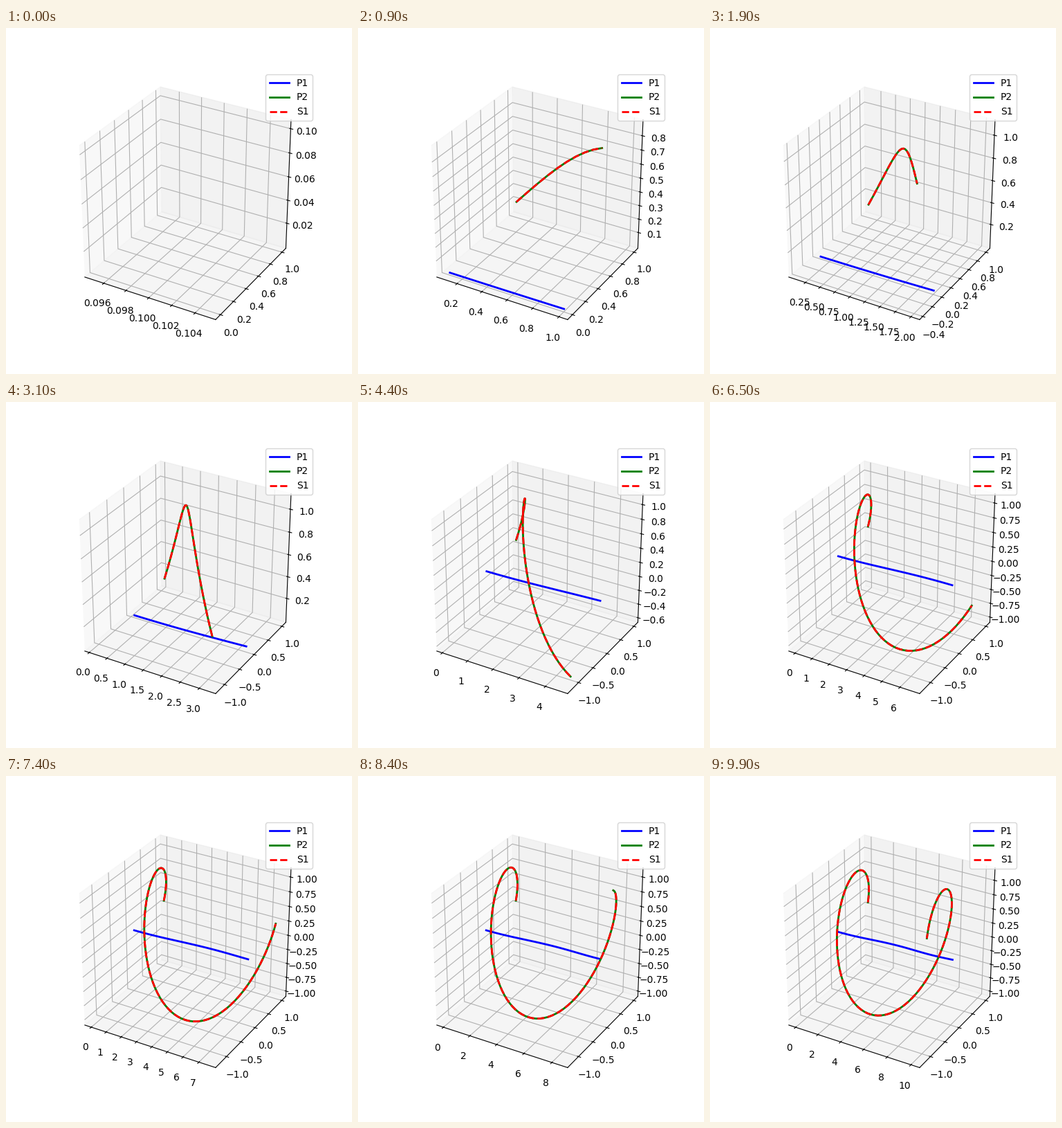
Recreate the animation shown at these times as a matplotlib script. Size 500x500 px, loop 10000 ms.

```python
import numpy as np
import matplotlib.pyplot as plt
from matplotlib.animation import FuncAnimation
from matplotlib.ticker import MaxNLocator

FRAMES, INTERVAL = 100, 100
MASS_1, MASS_2 = 1.0, 0.008
SPEED = 1.053        # sideways launch speed of the light body, one unit away
EDGE = 1 / 48        # gap between the axis limits and the panes


def orbit(t):
    """Exact two-body motion in the (y, z) plane, starting at periapsis."""
    mu = MASS_1 + MASS_2
    a = 1 / (2 - SPEED**2 / mu)
    e = 1 - 1 / a
    mean = np.sqrt(mu / a**3) * t
    ecc = mean.copy()
    for _ in range(20):
        ecc = mean + e * np.sin(ecc)
    rel = np.array([a * (np.cos(ecc) - e),
                    a * np.sqrt(1 - e**2) * np.sin(ecc)])
    share = MASS_2 / mu
    centre = np.array([np.full_like(t, share), share * SPEED * t])
    return centre - share * rel, centre + (1 - share) * rel


time = 0.1 * np.arange(1, FRAMES + 1)
heavy, light = orbit(time)

fig = plt.figure(figsize=(5, 5), dpi=100)
ax = fig.add_subplot(projection="3d")
ax.set_box_aspect((1, 1, 1), zoom=np.sqrt(3) / 1.8294640721620434)
ax.apply_aspect = lambda position=None: None   # keep the full subplot box

styles = (("b-", "P1", heavy), ("g-", "P2", light), ("r--", "S1", light))
lines = [(ax.plot([], [], [], fmt, lw=2, label=name)[0], path)
         for fmt, name, path in styles]
ax.legend(loc="upper right")

locator = MaxNLocator(9, steps=[1, 2, 2.5, 5, 10])


def fit(axis, set_lim, values, margin):
    """Fit one axis to its values and place the ticks."""
    lo, hi = np.min(values), np.max(values)
    if hi - lo < 1e-9:
        lo, hi = 0.95 * lo, 1.05 * hi
    pad = margin * (hi - lo)
    lo, hi = lo - pad, hi + pad
    ticks = locator.tick_values(lo, hi)
    gap = EDGE * (hi - lo)
    axis.set_ticks(ticks[(ticks >= lo) & (ticks <= hi)])
    set_lim(lo - gap, hi + gap)


def update(i):
    n = i + 1
    for line, (y, z) in lines:
        line.set_data_3d(time[:n], y[:n], z[:n])
    both = np.stack([heavy, light])[:, :, :n]
    fit(ax.xaxis, ax.set_xlim, time[:n], 0.05)
    fit(ax.yaxis, ax.set_ylim, both[:, 0], 0.05)
    fit(ax.zaxis, ax.set_zlim, both[:, 1], 0)
    return [line for line, _ in lines]


anim = FuncAnimation(fig, update, frames=FRAMES, interval=INTERVAL,
                     repeat=True, repeat_delay=0)
plt.show()
```
